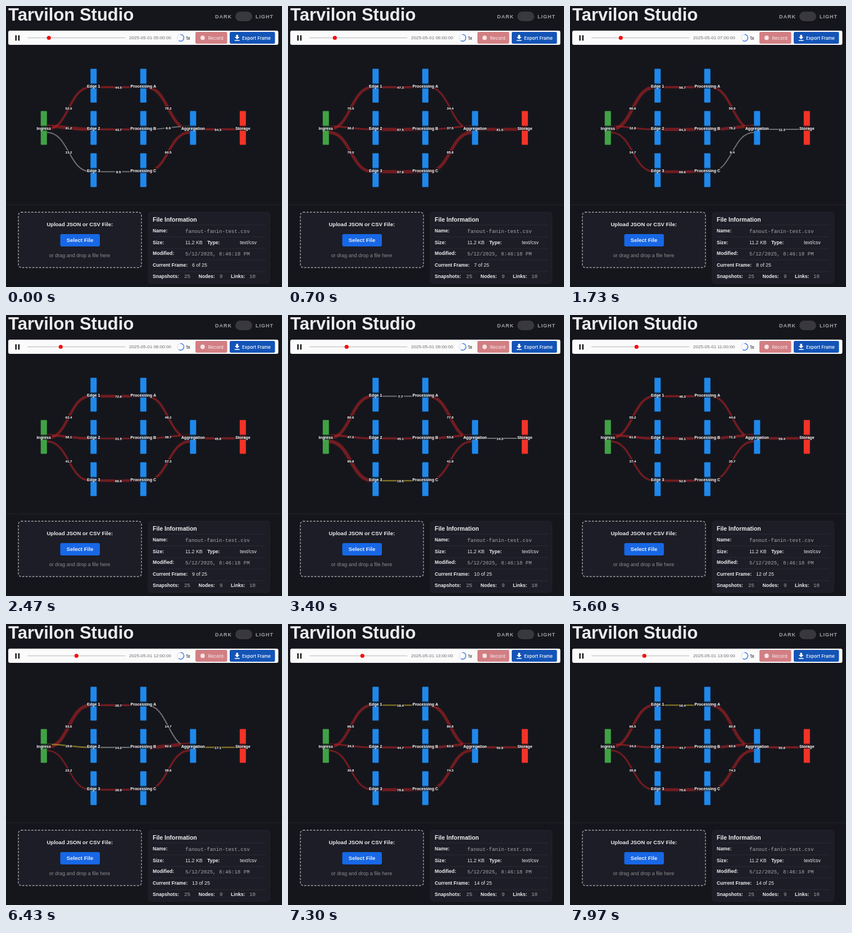
An HTML page that plays this animation: 491 px wide and 499 px high, repeating every 8000 ms.

```html
<!DOCTYPE html>
<html lang="en">
<head>
<meta charset="utf-8">
<title>Tarvilon Studio</title>
<style>
  html, body { margin: 0; width: 100%; height: 100%; overflow: hidden; background: #15161c; }
  svg { display: block; width: 491px; height: 499px; }
  text { font-family: "Liberation Sans", Arial, sans-serif; fill: #ececee; white-space: pre; }
  .bold { font-weight: 700; }
  .mono { font-family: "Liberation Mono", monospace; font-size: 9.1px; fill: #a6a6ab; }
  .ui { font-family: Inter, sans-serif; font-size: 8px; font-weight: 500; }
  .clock { font-size: 8.05px; fill: #6b6b70; }
  .mid { text-anchor: middle; }
  .mode { font-size: 9px; letter-spacing: 1px; fill: #a2a2a5; }
  .key { font-size: 8.6px; font-weight: 700; }
  .val { font-size: 8.8px; }
  .node { font-size: 7.2px; fill: #fff; }
  .amount { font-size: 6.2px; fill: #fff; }
  .link { fill: none; stroke-opacity: .6; }
</style>
</head>
<body>
<svg id="stage" viewBox="0 0 491 499"></svg>
<script>
const FIRST = 6, TOTAL = 25, STEP = 1000, LEAD = 200, LOOP = 8000;

// One row per snapshot: ingress to edges, edges to processing, processing to aggregation, storage.
const SNAPSHOTS = [
  [52.0, 91.2, 13.2, 44.5, 43.7, 8.5, 78.2, 6.9, 60.5, 54.3],
  [70.5, 36.2, 78.0, 47.3, 87.5, 87.8, 34.4, 37.5, 85.8, 81.5],
  [90.6, 32.8, 34.7, 56.7, 84.3, 68.6, 55.5, 78.2, 9.4, 11.3],
  [63.4, 58.1, 41.7, 72.6, 31.5, 66.9, 49.2, 38.7, 57.3, 45.8],
  [80.6, 47.0, 95.8, 7.7, 45.1, 19.5, 77.8, 53.6, 41.9, 14.3],
  [18.9, 92.4, 45.6, 54.7, 57.7, 9.7, 53.5, 42.8, 33.0, 67.6],
  [55.2, 61.8, 37.4, 48.3, 66.1, 52.9, 44.6, 71.3, 35.7, 59.4],
  [93.0, 19.6, 22.2, 38.7, 14.2, 38.9, 14.7, 92.6, 38.6, 17.1],
  [66.5, 34.3, 30.8, 16.4, 44.7, 78.6, 80.8, 63.9, 74.3, 50.8]
];

const BLUE = '#1e88ec';
const COLUMNS = [67.3, 155.8, 244.3, 332.8, 421.3];
const ROWS = [141.5, 216.5, 291.5];
const HUB_PORTS = [219, 213.5, 224.5];
const ROW_PORTS = [144.2, 219.2, 294.2];

const nodes = [
  ['Ingress', 0, 1, '#40a244'],
  ...[0, 1, 2].map(i => ['Edge ' + (i + 1), 1, i, BLUE]),
  ...[0, 1, 2].map(i => ['Processing ' + 'ABC'[i], 2, i, BLUE]),
  ['Aggregation', 3, 1, BLUE],
  ['Storage', 4, 1, '#f23428']
];
const links = [
  ...[0, 1, 2].map(i => [0, HUB_PORTS[i], ROW_PORTS[i]]),
  ...[0, 1, 2].map(i => [1, ROW_PORTS[i], ROW_PORTS[i]]),
  ...[0, 1, 2].map(i => [2, ROW_PORTS[i], HUB_PORTS[i]]),
  [3, 219, 219]
];

const text = (x, y, label, cls, extra = '') => `<text x="${x}" y="${y}" class="${cls}" ${extra}>${label}</text>`;
const rect = (x, y, w, h, fill, r = 0, extra = '') =>
  `<rect x="${x}" y="${y}" width="${w}" height="${h}" rx="${r}" fill="${fill}" ${extra}/>`;
const size = px => `style="font-size:${px}px"`;
const color = fill => `style="fill:${fill}"`;
const backing = (x, y, w, h) => rect(x - w / 2, y - h / 2, w, h, '#15161c', 1.5, 'fill-opacity=".78"');

function header() {
  return text(4, 26, 'Tarvilon Studio', 'bold', size(31)) +
    text(372, 22, 'DARK', 'bold mode') + text(444, 22, 'LIGHT', 'bold mode') +
    rect(408, 10, 30, 17, '#38383d', 8.5);
}

function toolbar() {
  return rect(4, 43.7, 480.5, 25.2, '#fbfbfc', 3) +
    rect(16.5, 52, 2.4, 9.5, '#111') + rect(21.7, 52, 2.4, 9.5, '#111') +
    rect(38, 55.7, 174.5, 1.6, '#c9c9cc', .8) +
    '<circle id="thumb" cy="56.5" r="3.6" fill="#f50d0d"/>' +
    text(219, 59.4, '', 'clock', 'id="clock"') +
    '<circle cx="310.5" cy="56.5" r="6" fill="none" stroke="#dfe5ee" stroke-width="1.3"/>' +
    '<path d="M310.5 50.5a6 6 0 1 1-3 11.2" fill="none" stroke="#3b7ee8" stroke-width="1.4"/>' +
    text(320, 59.5, '1x', 'ui', color('#333')) +
    rect(337, 46, 56.5, 21, '#d27f83', 2.5) +
    '<circle cx="349.8" cy="56.5" r="3.9" fill="#f6e4e5"/>' +
    text(359.5, 59.5, 'Record', 'ui', color('#f4dfe0')) +
    rect(398, 46, 80.5, 21, '#1354b6', 2.5) +
    '<path d="M409.4 51.3h3.6v3.6h2.6l-4.4 4.3-4.4-4.3h2.6zM406.8 60.4h8.8v1.5h-8.8z" fill="#fff"/>' +
    text(420, 59.5, 'Export Frame', 'ui', color('#fff'));
}

function diagram() {
  const bars = nodes.map(([, col, row, fill]) => rect(COLUMNS[col] - 5.5, ROWS[row] - 30, 11, 60, fill, 1));
  const paths = links.map(([col, y0, y1]) => {
    const x0 = COLUMNS[col] + 5.5, x1 = COLUMNS[col + 1] - 5.5, mid = (x0 + x1) / 2;
    return `<path class="link" d="M${x0} ${y0}C${mid} ${y0} ${mid} ${y1} ${x1} ${y1}"/>`;
  });
  const amounts = links.map(([col, y0, y1]) => {
    const x = (COLUMNS[col] + COLUMNS[col + 1]) / 2, y = (y0 + y1) / 2 + .3;
    return backing(x, y, 13, 6.5) + text(x, y + 2.2, '', 'bold mid amount');
  });
  const names = nodes.map(([name, col, row]) => {
    const x = COLUMNS[col], y = ROWS[row] + .6;
    return backing(x, y, name.length * 3.85 + 2, 9) + text(x, y + 2.5, name, 'bold mid node');
  });
  return [...bars, ...paths, ...amounts, ...names].join('');
}

function uploadPanel() {
  return rect(22, 366.3, 219, 98.2, '#1c1d26', 5, 'stroke="#a3a3a8" stroke-width="1.4" stroke-dasharray="3.6 2.4"') +
    text(131.3, 391, 'Upload JSON or CSV File:', 'bold mid', size(9.55)) +
    rect(96.5, 405, 70.5, 22, '#1767e6', 3) +
    text(131.5, 419.4, 'Select File', 'bold mid', size(9.6)) +
    text(131, 445.6, 'or drag and drop a file here', 'mid', 'style="font-size:9px;fill:#8d8d92"');
}

function infoPanel() {
  const rules = [388.5, 409.5, 430.5, 450.5, 471.5].map(y => rect(261, y, 201, .8, '#2d2e38')).join('');
  return rect(253, 366, 216.5, 126.5, '#1c1d26', 5, 'stroke="#25262f" stroke-width=".8"') + rules +
    text(261, 382.6, 'File Information', 'bold', size(10.5)) +
    text(261, 402.4, 'Name:', 'key') + text(319, 402.6, 'fanout-fanin-test.csv', 'mono') +
    text(261, 422.8, 'Size:', 'key') + text(319, 422.8, '11.2 KB', 'val') +
    text(358, 422.8, 'Type:', 'key') + text(416, 422.8, 'text/csv', 'val') +
    text(261, 442.3, 'Modified:', 'key') + text(319, 442.5, '5/12/2025, 8:46:18 PM', 'mono') +
    text(261, 463, 'Current Frame:', 'key') + text(331, 463, '', 'val', 'id="counter"') +
    text(261, 482.6, 'Snapshots:', 'key') + text(317, 482.6, '25', 'mono') +
    text(342.5, 482.6, 'Nodes:', 'key') + text(380, 482.6, '9', 'mono') +
    text(400, 482.6, 'Links:', 'key') + text(433, 482.6, '10', 'mono');
}

const stage = document.getElementById('stage');
stage.innerHTML = rect(0, 0, 491, 499, '#15161c') + rect(0, 352.5, 491, 1, '#23242b') +
  header() + toolbar() + diagram() + uploadPanel() + infoPanel();

const linkPaths = [...stage.querySelectorAll('.link')];
const amountLabels = [...stage.querySelectorAll('.amount')];
const [thumb, clock, counter] = ['thumb', 'clock', 'counter'].map(id => document.getElementById(id));

const linkColor = value => value < 15 ? '#a8a8a8' : value < 20 ? '#c4aa2c' : '#ae2024';

function show(index) {
  const frame = FIRST + index;
  thumb.setAttribute('cx', 41.3 + 7 * (frame - 1));
  clock.textContent = `2025-05-01 ${String(frame - 1).padStart(2, '0')}:00:00`;
  counter.textContent = `${frame} of ${TOTAL}`;
  SNAPSHOTS[index].forEach((value, i) => {
    linkPaths[i].setAttribute('stroke', linkColor(value));
    linkPaths[i].setAttribute('stroke-width', 1.5 + value * .05);
    amountLabels[i].textContent = value.toFixed(1);
  });
}

let shown = -1;
const start = performance.now();
function tick() {
  const time = (performance.now() - start) % LOOP;
  const index = Math.floor((time - LEAD) / STEP) + 1;
  if (index !== shown) show(shown = index);
  requestAnimationFrame(tick);
}
tick();
</script>
</body>
</html>
```
